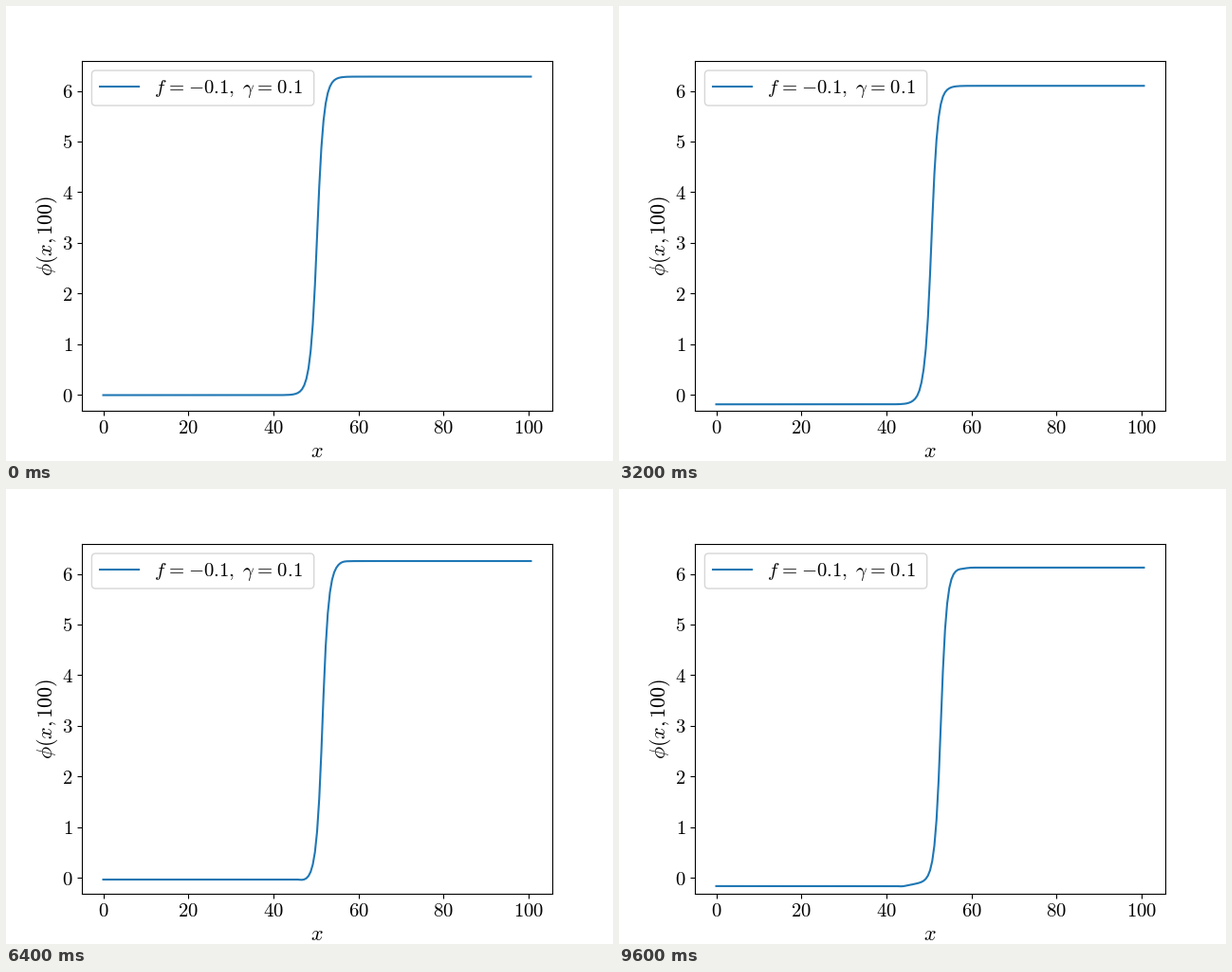
Animation of 640 by 480 pixels, one loop 9.8 s. Source, as a matplotlib script:

```python
import numpy as np
import matplotlib.pyplot as plt
from matplotlib.animation import FuncAnimation
from matplotlib.lines import Line2D
from matplotlib.patches import FancyBboxPatch
from matplotlib.transforms import IdentityTransform

plt.rcParams["mathtext.fontset"] = "cm"

W, H, DPI = 640, 480, 100
FRAMES, INTERVAL = 49, 200
FORCE, DAMPING = -0.1, 0.1
LENGTH, POINTS = 32 * np.pi, 201
FRAME_DT, SUBSTEPS = 0.2, 4
BLUE = "#1f77b4"
SMALL, LARGE = 14.94, 15.94

x = np.linspace(0, LENGTH, POINTS)


def solve():
    """Leapfrog solution of the driven, damped sine-Gordon equation."""
    dx, dt = x[1] - x[0], FRAME_DT / SUBSTEPS

    def accel(phi):
        p = np.pad(phi, 1, mode="edge")
        return (p[2:] - 2 * phi + p[:-2]) / dx**2 - np.sin(phi) + FORCE

    phi = 4 * np.arctan(np.exp(x - LENGTH / 2))
    prev = phi + 0.5 * dt**2 * accel(phi)
    drag = DAMPING * dt / 2
    states = []
    for _ in range(FRAMES):
        for _ in range(SUBSTEPS):
            new = (2 * phi - (1 - drag) * prev + dt**2 * accel(phi)) / (1 + drag)
            prev, phi = phi, new
        states.append(phi)
    return states


states = solve()

fig = plt.figure(figsize=(W / DPI, H / DPI), dpi=DPI)
ax = fig.add_axes([0.125, 0.11, 0.775, 0.77])
pixels = IdentityTransform()


def label(px, py, text, size=SMALL, **kw):
    """Place math text with its baseline at a pixel measured from the top left."""
    fig.text(px, H - py, f"${text}$", size=size, transform=pixels,
             va="baseline", **kw)


ax.set_xlim(-LENGTH / 20, LENGTH * 1.05)
ax.set_ylim(-np.pi / 10, 2.1 * np.pi)
ax.set_xticks(range(0, 101, 20))
ax.set_yticks(range(7))
ax.tick_params(labelbottom=False, labelleft=False)

for v in range(0, 101, 20):
    px = ax.transData.transform((v, 0))[0]
    label(px, 451, v, ha="center")
for v in range(7):
    py = H - ax.transData.transform((0, v))[1]
    label(70.3, py + 7.2, v, ha="right")

label(328, 476.4, "x", LARGE, ha="center")
label(48.8, 242.4, r"\phi(x,\hspace{-0.033}100)", LARGE, ha="center",
      rotation=90, rotation_mode="anchor")

# Legend
fig.add_artist(FancyBboxPatch(
    (90.4, H - 105), 234.3, 37, boxstyle="round,pad=0,rounding_size=4.17",
    transform=pixels, fc="white", ec="0.8", lw=1, alpha=0.8))
fig.add_artist(Line2D([98.75, 140.4], [H - 85, H - 85], color=BLUE, lw=1.5,
                      solid_capstyle="projecting", transform=pixels))
EQ = r"\hspace{0.078}=\hspace{0.078}"
label(156.5, 92.2, "f" + EQ + "{-}0.1,")
label(249, 92.2, r"\gamma" + EQ + "0.1")

curve, = ax.plot(x, states[0], color=BLUE, lw=1.5)


def update(i):
    curve.set_ydata(states[i])
    return curve,


anim = FuncAnimation(fig, update, frames=FRAMES, interval=INTERVAL,
                     repeat=True, repeat_delay=0)
plt.show()
```
